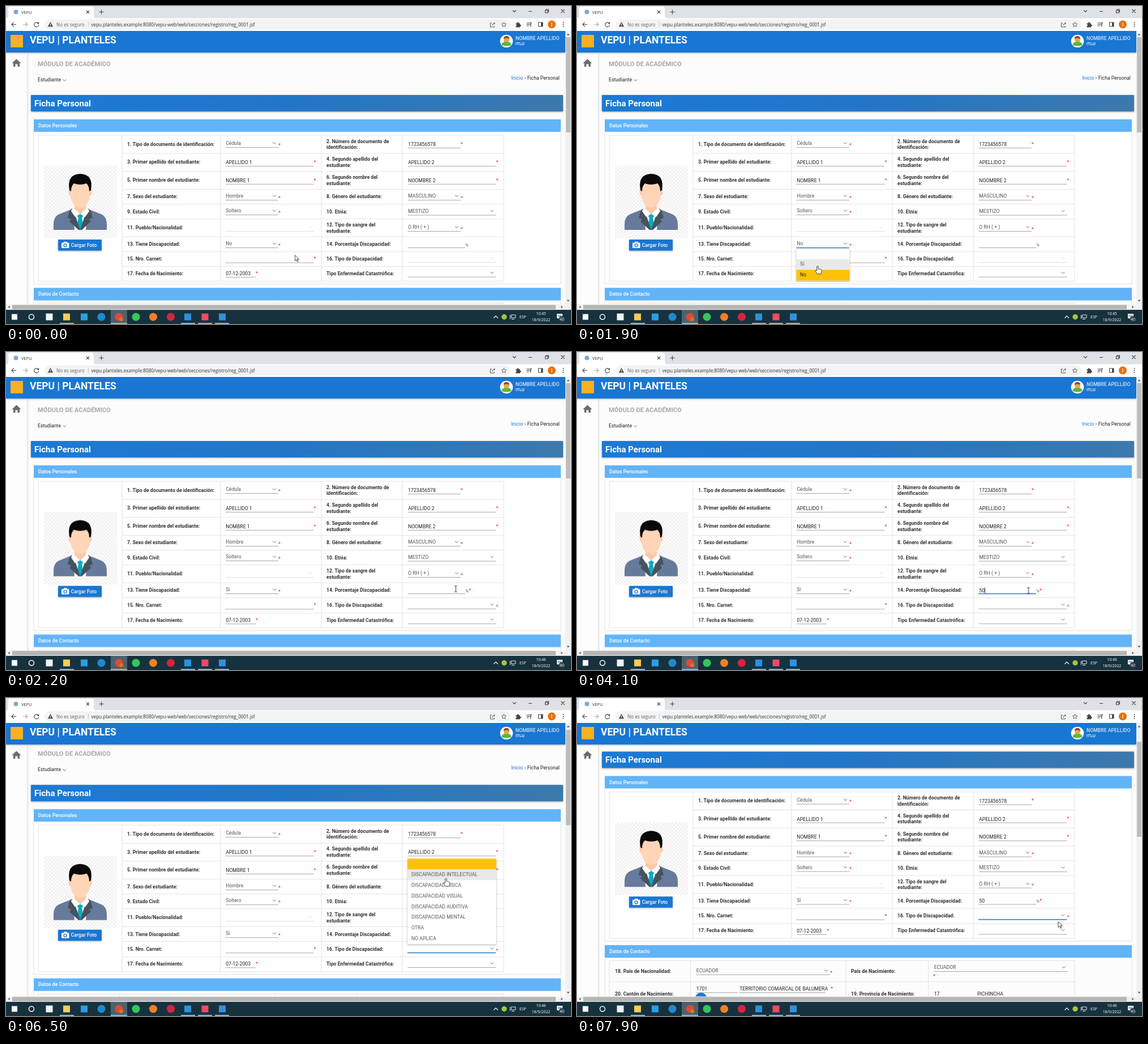
An HTML page that plays this animation: 998x561 px, repeating every 8 s.

```html
<!DOCTYPE html>
<html lang="es">
<head>
<meta charset="utf-8">
<title>Ficha Personal</title>
<style>
html, body { margin: 0; width: 100%; height: 100%; overflow: hidden; background: #fff; }
svg { display: block; font: 8.7px Roboto, sans-serif; }
text { fill: #333; white-space: pre; }
.b { font-weight: 700; }
.val { fill: #222; }
.opt { fill: #555; }
.w { fill: #fff; font-weight: 500; }
.star { fill: #f22; font-size: 9.5px; }
.ui { font: 8.15px "Open Sans", sans-serif; }
.bar text { fill: #fff; font: 6.9px "Open Sans", sans-serif; text-anchor: middle; }
.ln { fill: none; stroke-width: .8; }
.ic { fill: none; stroke: #444; stroke-width: 1.1; }
.lift { filter: drop-shadow(0 1px 1.5px #0005); }

.scroll, .thumb, .low, .half, .caret, .hov1, .hov2, .cursor, .grow {
  animation: scroll 8s step-end infinite;
}
.thumb { animation-name: thumb; }
.low { animation-name: low; }
.half { animation-name: half; }
.caret { animation-name: caret; }
.hov1 { animation-name: hov1; }
.hov2 { animation-name: hov2; }
.cursor { animation-name: cursor; }
.grow { animation-name: grow; transform-origin: 788px 438px; }

@keyframes scroll {
  0% { transform: none; }
  81.25% { transform: translateY(-3.8px); }
  82.5% { transform: translateY(-40px); }
  83.75%, 100% { transform: translateY(-62.4px); }
}
@keyframes thumb {
  0% { transform: none; }
  81.25% { transform: translateY(1.3px); }
  82.5% { transform: translateY(14px); }
  83.75%, 100% { transform: translateY(22px); }
}
@keyframes low { 0% { transform: none; } 26.25%, 100% { transform: translateY(1.2px); } }
@keyframes half { 0% { transform: none; } 26.25%, 100% { transform: translateY(.6px); } }
@keyframes caret {
  0% { opacity: 0; transform: none; }
  32.5% { opacity: 1; transform: none; }
  41.25% { opacity: 0; transform: none; }
  46.25% { opacity: 1; transform: translateX(5px); }
  51.25% { opacity: 1; transform: translateX(10px); }
  58.75%, 100% { opacity: 0; transform: translateX(10px); }
}
@keyframes hov1 {
  0% { opacity: 0; transform: none; }
  15% { opacity: 1; transform: none; }
  17.5%, 100% { opacity: 1; transform: translateY(18.8px); }
}
@keyframes hov2 {
  0% { opacity: 0; transform: none; }
  72.5% { opacity: 1; transform: translateY(113px); }
  73.75% { opacity: 1; transform: translateY(94.2px); }
  75% { opacity: 1; transform: translateY(75.3px); }
  76.25% { opacity: 1; transform: translateY(56.5px); }
  77.5% { opacity: 1; transform: translateY(37.7px); }
  78.75% { opacity: 1; transform: none; }
  83.75% { opacity: 1; transform: translateY(75.3px); }
  86.25% { opacity: 1; transform: translateY(94.2px); }
  91.25% { opacity: 1; transform: translateY(113px); }
  96.25%, 100% { opacity: 0; transform: translateY(113px); }
}
@keyframes grow {
  0% { opacity: .5; transform: scaleY(.89); }
  65%, 100% { opacity: 1; transform: none; }
}
@keyframes cursor {
  0% { transform: translate(510.5px, 439.5px); animation-timing-function: steps(5); }
  6.25% { transform: translate(470.5px, 421.5px); }
  12.5% { transform: translate(470.5px, 421.5px); animation-timing-function: steps(5); }
  18.75% { transform: translate(423.5px, 458px); }
  21.25% { transform: translate(425px, 459px); }
  25% { transform: translate(436px, 458px); }
  26.25% { transform: translate(640px, 432px); }
  27.5% { transform: translate(794.5px, 418px); }
  30% { transform: translate(797px, 420.5px); }
  43.75% { transform: translate(798.5px, 421.5px); }
  47.5% { transform: translate(797.5px, 421px); }
  53.75% { transform: translate(797.5px, 421px); animation-timing-function: steps(6); }
  61.25% { transform: translate(853px, 438.5px); }
  71.25% { transform: translate(853px, 438.5px); animation-timing-function: steps(3); }
  75% { transform: translate(825px, 395px); animation-timing-function: steps(3); }
  78.75% { transform: translate(778px, 322px); }
  81.25% { transform: translate(777px, 318.5px); }
  83.75% { transform: translate(777px, 318.5px); animation-timing-function: steps(3); }
  87.5% { transform: translate(800px, 342px); animation-timing-function: steps(8); }
  97.5% { transform: translate(848.5px, 391px); }
  98.75%, 100% { transform: translate(850px, 394.5px); }
}
</style>
</head>
<body>
<svg id="stage" width="998" height="561" viewBox="0 0 998 561"></svg>
<script>
const DUR = 8000;

// Time spans, in ms, during which a class is visible
const spans = {
  pre: [0, 2100], post: [2100, DUR], no: [0, 2000], yes: [2000, DUR],
  list1: [700, 2000], focus14: [2500, 5000], focus16: [5000, DUR],
  list2: [5100, 7900], five: [3700, 4100], fifty: [4100, DUR],
  arrowA: [0, 500], handA: [500, 2000], arrowB: [2000, 2200], beam: [2200, 4500],
  arrowC: [4500, 4800], handB: [4800, 7900], arrowD: [7900, DUR]
};
const css = Object.entries(spans).map(([id, [a, b]]) =>
  `@keyframes ${id} { 0% { opacity: ${a ? 0 : 1} } ${a * 100 / DUR}% { opacity: 1 } ${b * 100 / DUR}% { opacity: 0 } }
  .${id} { animation: ${id} 8s step-end infinite }`).join('\n');
document.head.appendChild(document.createElement('style')).textContent = css;

// y is the middle of the capital letters
const txt = (x, y, s, c = 'val', extra = '') => `<text x="${x}" y="${y + 3.1}" class="${c}" ${extra}>${s}</text>`;
const rect = (x, y, w, h, fill, extra = '') => `<rect x="${x}" y="${y}" width="${w}" height="${h}" fill="${fill}" ${extra}/>`;
const disc = (x, y, r, fill) => `<circle cx="${x}" cy="${y}" r="${r}" fill="${fill}"/>`;
const path = (d, c = 'ic', extra = '') => `<path d="${d}" class="${c}" ${extra}/>`;
const line = (d, color) => path(d, 'ln', `stroke="${color}"`);
const group = (c, ...parts) => `<g class="${c}">${parts.join('')}</g>`;
const star = (x, y) => `<text x="${x}" y="${y + 4.9}" class="star">*</text>`;
const under = (x, y, w, color = '#909090') => line(`M${x} ${y}h${w}`, color);
const focus = (x, y, w) => rect(x, y - .7, w, 1.4, '#1976d2');
const chev = (x, y, color = '#444') => line(`M${x - 2.8} ${y - 1.4}l2.8 2.8 2.8-2.8`, color);
const label = (x, y, s) => {
  const parts = s.split('|');
  return parts.map((p, i) => txt(x, y + (i - (parts.length - 1) / 2) * 10.5, p, 'b')).join('');
};
const select = (x, y, s, w = 93.5, req = true, color) =>
  txt(x + .7, y - 1, s, 'opt') + under(x, y + 6.5, w, color) + chev(x + w - 7, y - 1, color) +
  (req ? star(x + w, y + 1) : '');
const input = (x, y, s, w = 156, req = true) =>
  txt(x + .7, y + .5, s) + under(x, y + 7, w) + (req ? star(x + w, y - 1.5) : '');

const A = 387.5, B = 709.5, GRID = '#dcdcdc', PALE = '#dfd5d8';
const pair = (y, left, right) => label(214, y, left) + label(566, y, right);

const photo = () => `<defs><pattern id="check" width="6.4" height="6.4" patternUnits="userSpaceOnUse">
  ${rect(0, 0, 6.4, 6.4, '#fff') + rect(0, 0, 3.2, 3.2, '#f1eef0') + rect(3.2, 3.2, 3.2, 3.2, '#f1eef0')}</pattern></defs>` +
  rect(67, 281.5, 129, 128, 'url(#check)') +
  `<path fill="#667a9b" d="M84 395V385Q84 370 97 366L117 358H145L165 366Q178 370 178 385V395Z"/>
  <path fill="#fff" d="M118 357L131 369 144 357 141 395H121Z"/>
  <path fill="#fcc9a6" d="M121 342H141V358L131 368 121 358Z"/>
  <path fill="#09a9c4" d="M127 366H135L136 371 134 374 137 388 131 395 125 388 128 374 126 371Z"/>
  <path fill="#46525e" d="M118 356L112 362 109 374 115 376 112 380 128 395H131Z M144 356L150 362 153 374 147 376 150 380 134 395H131Z"/>
  <path fill="#fff" d="M118 355L115 362 122 372 131 367Z M144 355L147 362 140 372 131 367Z"/>
  <path fill="#fcc9a6" d="M111 322Q109 334 115 336H147Q153 334 151 322Z"/>
  <path fill="#ffd5b8" d="M114 313H148V336Q145 354 131 356 117 354 114 336Z"/>
  <path fill="#090909" d="M112 325Q107 297 131 296 155 297 150 325L147 327Q147 317 142 313 131 317 120 313 115 317 115 327Z"/>` +
  rect(92, 412, 77, 19.5, '#1976d2', 'rx="1" class="lift"') +
  rect(98, 417.5, 13.5, 9.5, '#fff', 'rx="1.5"') + rect(102, 415.8, 5.5, 3, '#fff', 'rx="1"') +
  `<circle cx="104.7" cy="422.2" r="2.6" fill="#fff" stroke="#1976d2" stroke-width="1.3"/>` +
  txt(114.7, 421.6, 'Cargar Foto', 'w');

const tops = [228, 260, 291.7, 323.4, 349.5, 375.6, 407.2, 433.3];
const form = () =>
  rect(49, 222, 931, 266, '#fff') + line('M49 222V489M980 222V489', GRID) +
  line(tops.map((y, i) => `M${i ? 205 : 57} ${y}H879`).join(''), GRID) +
  line([57, 205, 378.5, 557, 700, 879].map(x => `M${x} 228V484`).join(''), GRID) +
  group('half', photo()) +
  pair(243.7, '1. Tipo de documento de identificación:', '2. Número de documento de|identificación:') +
  select(A, 243, 'Cédula') + input(B, 243.5, '1723456578', 93.5) +
  pair(275.3, '3. Primer apellido del estudiante:', '4. Segundo apellido del|estudiante:') +
  input(A, 275.5, 'APELLIDO 1') + input(B, 275.5, 'APELLIDO 2') +
  pair(307.2, '5. Primer nombre del estudiante:', '6. Segundo nombre del|estudiante:') +
  input(A, 307.3, 'NOMBRE 1') + input(B, 307.3, 'NOOMBRE 2') +
  pair(336.3, '7. Sexo del estudiante:', '8. Género del estudiante:') +
  select(A, 336, 'Hombre') + select(B, 336, 'MASCULINO') +
  pair(362.4, '9. Estado Civil:', '10. Etnia:') +
  select(A, 362, 'Soltero') + select(B, 362.5, 'MESTIZO', 156, false) +
  pair(391.2, '11. Pueblo/Nacionalidad:', '12. Tipo de sangre del|estudiante:') +
  select(A, 391, '', 156, false, PALE) + select(B, 391, 'O RH ( + )') +
  pair(420.3, '13. Tiene Discapacidad:', '14. Porcentaje Discapacidad:') +
  select(A, 420, '') + group('no', txt(388.2, 419, 'No', 'opt')) + group('yes', txt(388.2, 419, 'Sí', 'opt')) +
  input(B, 419.5, '', 101.5, false) + txt(811, 420.4, '%', 'opt', 'font-size="8"') +
  group('post', star(817, 419)) + group('focus14', focus(709, 426.5, 102)) +
  group('five', txt(710.3, 420.5, '5')) + group('fifty', txt(710.3, 420.5, '50')) +
  group('caret', rect(710.1, 415.3, .8, 10.5, '#111')) +
  group('half',
    pair(446.1, '15. Nro. Carnet:', '16. Tipo de Discapacidad:'),
    input(A, 446, ''),
    group('pre', select(B, 446, '', 156, false, '#d8d8d8')),
    group('post', select(B, 446, '', 156)),
    group('focus16', focus(709, 452.6, 156))) +
  group('low',
    line('M205 459.4H879M57 485.3H879M49 490.3H980', GRID),
    line([57, 205, 378.5, 557, 700, 879].map(x => `M${x} 482V485`).join('') + 'M49 487v3M980 487v3', GRID),
    pair(471.6, '17. Fecha de Nacimiento:', 'Tipo Enfermedad Catastrófica:'),
    input(A, 471.4, '07-12-2003', 53.5), select(B, 471.6, '', 156, false),
    contact());

const contact = () => `<g transform="translate(0 61.2)">` +
  rect(49, 436, 931, 22.2, '#62b4f8') + txt(57, 446.8, 'Datos de Contacto', 'w') +
  line('M49 458V560M980 458V560M57 463.3H879M57 500.5H879', GRID) +
  line([57, 200.5, 475, 620.5, 879].map(x => `M${x} 463V560`).join(''), GRID) +
  label(67, 482, '18. País de Nacionalidad:') + select(210, 481.7, 'ECUADOR', 237, true) +
  label(484, 482, 'País de Nacimiento:') + select(630, 476, 'ECUADOR', 237, false) + star(629, 489.5) +
  label(67, 521.8, '20. Cantón de Nacimiento:') + input(210, 512.8, '1701', 74, false) +
  input(286.5, 512.8, 'TERRITORIO COMARCAL DE BALUMERA', 152, false) + star(448, 511.5) +
  disc(219, 530, 10.3, '#1976d2') +
  label(484, 521.8, '19. Provincia de Nacimiento:') + txt(630.7, 521.8, '17') + txt(707, 521.8, 'PICHINCHA') + '</g>';

const kinds = ['INTELECTUAL', 'FISICA', 'VISUAL', 'AUDITIVA', 'MENTAL'].map(k => 'DISCAPACIDAD ' + k).concat('OTRA', 'NO APLICA');
const lists = () =>
  group('list1', focus(387.5, 426.6, 93),
    rect(387.5, 428, 94, 56.7, '#fff', 'class="lift"'),
    rect(387.5, 428, 94, 18.8, '#e9e9e9', 'class="hov1"'),
    rect(387.5, 465.4, 94, 19, '#ffc107'),
    txt(394, 455.2, 'Sí', 'opt'), txt(394, 474.2, 'No')) +
  group('list2', group('grow',
    rect(709.3, 287.3, 156.7, 151, '#fff', 'class="lift"'),
    rect(709.3, 287.3, 156.7, 18.8, '#ffc107'),
    rect(709.3, 306.1, 156.7, 18.8, '#e9e9e9', 'class="hov2"'),
    ...kinds.map((k, i) => txt(716, 315 + i * 18.83, k, 'opt'))));

const page = () => rect(0, 44, 998, 492, '#fcfcfc') + group('scroll',
  txt(56, 102.5, 'MÓDULO DE ACADÉMICO', 'b', 'style="font-size:11.2px;fill:#a9a9a9"'),
  txt(56, 130, 'Estudiante', 'val'), chev(103.5, 131),
  txt(892.5, 127, 'Inicio', 'val', 'style="fill:#2a74cc"'), line('M915.5 125.4l2.5 1.7-2.5 1.7', '#777'),
  txt(920.7, 127, 'Ficha Personal'),
  `<defs><linearGradient id="title"><stop stop-color="#1b7ad6"/><stop offset=".5" stop-color="#2376c6"/><stop offset="1" stop-color="#3d79ac"/></linearGradient></defs>`,
  rect(44, 157, 940, 29, 'url(#title)', 'rx="1" class="lift"'),
  `<text x="50" y="176.7" class="b" style="font-size:15px;fill:#fff">Ficha Personal</text>`,
  rect(49, 200, 931, 22.3, '#62b4f8'), txt(57, 211, 'Datos Personales', 'w'),
  form(), lists());

const shell = () =>
  rect(0, 82, 37.5, 446, '#fdfdfd', 'class="lift"') +
  `<path fill="#6b6b6b" d="M18.500 93.500L26.500 101H24V107H20.500V102.500H16.500V107H13V101H10.500Z"/>` +
  rect(0, 44, 988, 38, '#1976d2', 'class="lift"') +
  rect(8, 51, 22, 22, '#fbb024') +
  `<text x="42" y="65.700" class="b" style="font-size:17.5px;fill:#fff">VEPU | PLANTELES</text>` +
  disc(884, 62, 11.3, '#fff') +
  `<path fill="#57b83c" d="M875.500 69Q876 62.500 884 62.500T892.500 69Q884 72 875.500 69Z"/>` +
  disc(884, 59, 5, '#f0a24c') + `<path fill="#8a4a1c" d="M879 58Q879 53 884 53T889 58Q884 55 879 58Z"/>` +
  txt(900, 56.5, 'NOMBRE APELLIDO', 'w', 'style="fill:#cfe4fa"') +
  txt(900, 65.8, 'ITLU', 'w', 'style="font-size:7.7px"') +
  rect(988, 44, 10, 483, '#f1f1f1') + rect(989, 55, 8, 168, '#bdbdbd', 'class="thumb"') +
  rect(0, 526.5, 998, 9.500, '#f1f1f1') + rect(11, 527.3, 960, 7.700, '#b5b5b5') +
  `<path fill="#555" d="M990.500 51.500l2.500-3 2.500 3zM990.500 518.500l2.500 3 2.500-3zM6.500 528.700l-3 2.300 3 2.300zM980.500 528.700l3 2.300-3 2.300z"/>`;

const browser = () =>
  rect(0, 0, 998, 44, '#dee1e6') +
  `<path fill="#fff" d="M0 21.500Q4 21.500 4 17V5Q4 1 8 1H151Q155 1 155 5V17Q155 21.500 159 21.500H998V44H0Z"/>` +
  disc(17.500, 10.500, 4, '#7da7d9') + txt(27, 10.500, 'VEPU', 'ui', 'style="font-size:7.6px"') +
  path('M142 8l5 5m0-5l-5 5M164.500 10.500h8m-4-4v8M895 7.500l3 3 3-3M923 9.500h6M952.500 7.500h4.500v4.500h-4.500zM954 7.500v-1.500h4.500v4.500H957M980.500 6l6 6m0-6l-6 6') +
  path('M18 32.500H10m3.700-3.800L10 32.500l3.700 3.800') +
  path('M30 32.500h8m-3.700-3.800l3.700 3.800-3.700 3.800', 'ic', 'style="stroke:#aaa"') +
  path('M57 30.500A4 4 0 1 0 57.700 33.500M57.700 28.500v2.700H55') +
  rect(68, 23.500, 823, 18, '#f1f3f4', 'rx="9"') +
  `<path fill="#4d5156" d="M78.500 28l4.700 8.500H73.800Z"/>` + rect(78, 31, 1, 2.700, '#fff') + rect(78, 34.400, 1, 1, '#fff') +
  txt(89, 32.700, 'No es seguro', 'ui', 'style="fill:#5f6368"') + line('M145.500 28v9', '#bbb') +
  txt(150.500, 32.700, 'vepu.planteles.example:8080/vepu-web/web/secciones/registro/reg_0001.jsf', 'ui') +
  path('M858 30h-2.500v7h7v-2M858.500 34.500q.5-4 5-4m-2-2l2.200 2-2.200 2', 'ic', 'style="stroke-width:.9"') +
  path('M879.500 28.500l1.200 2.700 3 .3-2.200 2 .6 3-2.600-1.600-2.600 1.600.6-3-2.200-2 3-.3z', 'ic', 'style="stroke-width:.8"') +
  `<path fill="#444" d="M900.500 30.500h2.300q0-2.300 1.500-2.300t1.500 2.300H908v2.300q2 0 2 1.500t-2 1.500V37.500h-7.500V35q1.700 0 1.700-1.300t-1.700-1.300z"/>` +
  path('M919.500 30h7m-7 2.500h7m-7 2.500h4M927 29v6.500h-1.500m1.500-6h2') +
  path('M940.500 29h7.500v7h-7.500z') + rect(945, 29, 3, 7, '#444') +
  disc(964, 32.500, 7, '#e8710a') + txt(964, 32.500, 'I', 'w', 'text-anchor="middle"') +
  [29, 32.500, 36].map(y => disc(984.500, y, 1, '#444')).join('');

const tile = (x, fill, s = 12) => rect(x - s / 2, 548.500 - s / 2, s, s, fill);
const taskbar = () => group('bar',
  rect(0, 536, 998, 25, '#17323f'), rect(185, 536, 29, 25, '#4b626d'),
  tile(15, '#fff', 10), `<circle cx="45" cy="548.500" r="4.500" fill="none" stroke="#fff" stroke-width="1.500"/>`,
  tile(76.500, '#f2f2f2'), tile(107, '#f8cc55'), tile(138, '#2b9fe3'),
  disc(168.500, 548.500, 7, '#2089cf'), disc(199.500, 548.500, 7, '#dc4b3c'), disc(203.500, 552.500, 3.500, '#e8710a'),
  disc(229.500, 548.500, 7, '#34c759'), disc(260, 548.500, 7, '#f57f25'), disc(291, 548.500, 7, '#d9233f'),
  tile(321, '#2a92dc'), tile(351.500, '#ef4b62'), tile(382, '#3490dc'),
  ...[95, 185, 309, 339, 369].map(x => rect(x, 559, x === 185 ? 29 : 25, 2, '#76b9ed')),
  path('M861.500 550.500l3.700-3.700 3.700 3.700', 'ic', 'style="stroke:#fff"'),
  disc(880, 548.500, 4.700, '#a4c639'),
  path('M892.500 545h7.500v5h-7.500zM893 552.500h5M890.500 545v7', 'ic', 'style="stroke:#fff;stroke-width:.9"'),
  txt(913, 548, 'ESP', ''),
  group('pre', txt(945, 542, '10:45', '')), group('post', txt(945, 542, '10:46', '')),
  txt(945, 553, '18/9/2022', ''),
  `<path fill="#fff" d="M973 543h10v8h-5l-2 2v-2h-3z"/>`,
  path('M974.500 545.500h7m-7 2h7', 'ic', 'style="stroke:#17323f;stroke-width:.7"'),
  disc(982, 552.500, 5.500, '#2b3d47'), txt(982, 551.800, '40', 'b'));

const arrow = `<path fill="#fff" stroke="#111" stroke-width=".8" d="M0 0V10.200L2.400 8 4 11.800 5.600 11.100 4 7.400H7.200Z"/>`;
const hand = `<path fill="#fff" stroke="#111" stroke-width=".8" d="M-1.300 8V1Q-1.300 0 0 0T1.200 1V5Q3 4 3.500 5.400 5 4.700 5.400 6.100 7 5.900 7 7.200V10Q7 11.500 6 13.700H-.5Q-2 11-4 8.500-4.300 7-2.800 7Z"/>`;
const beam = path('M-2.300-5.200H-.7L0-4.600.7-5.200H2.300M0-4.600V4.600M-2.300 5.200H-.7L0 4.600.7 5.200H2.300', 'ic', 'style="stroke:#111;stroke-width:.9"');
const cursor = () => group('cursor',
  ...['arrowA', 'arrowB', 'arrowC', 'arrowD'].map(c => group(c, arrow)),
  group('handA', hand), group('handB', hand), group('beam', beam));

document.getElementById('stage').innerHTML = page() + shell() + browser() + taskbar() + cursor();
</script>
</body>
</html>
```
